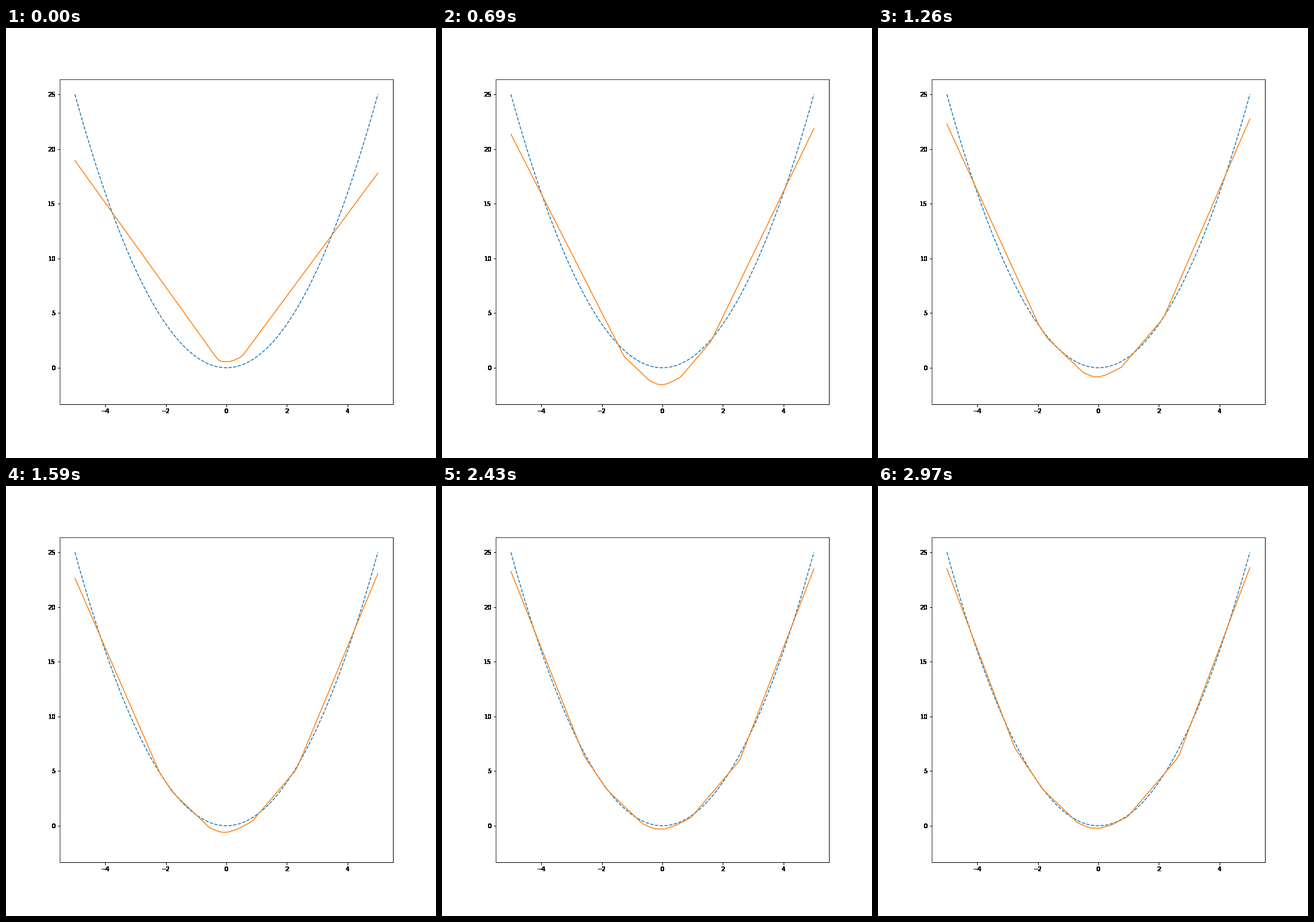
Write a matplotlib script that moves like this. It is 720 by 720 pixels and loops after 3000 ms.

```python
import matplotlib.pyplot as plt
import numpy as np
from matplotlib.animation import FuncAnimation

FRAMES, STEP = 100, 30
DIP = 0.42     # seconds until the fit has sunk to its lowest point
LOW = -1.99    # lowest value the y range is fitted to

x = np.linspace(-5, 5, 100)

# Inner pieces of the fit: fixed slopes, with their final height above
# the tangent of x**2 that has the same slope
slopes = np.array([-4.1, -2.65, -1.15, -0.1, 0.8, 1.4, 3.25])
rest = np.array([0, 0.22, -0.15, -0.15, -0.05, 0, 0.33])


def settle(t, start, dip, end, tau):
    """Ease from start to dip, then relax exponentially to end."""
    if t < DIP:
        return dip + (start - dip) * (1 - t / DIP) ** 1.4
    return end + (dip - end) * np.exp((DIP - t) / tau)


def fitted(t):
    """Convex piecewise-linear fit: the upper envelope of straight lines."""
    sq = slopes ** 2
    lift = settle(t, 0.56 + 0.125 * sq, 0.135 * sq - 2.1, rest,
                  0.8 / (1 + 0.1 * sq))
    inner = slopes[:, None] * x + (lift - sq / 4)[:, None]

    # Outer arms hang from the curve's two ends
    left = (settle(t, 18.95, 20.76, 23.95, 1.3)
            - settle(t, 3.86, 5.1, 8.8, 2.8) * (x + 5))
    right = (settle(t, 17.8, 21.2, 23.75, 0.9)
             - settle(t, 3.74, 5.32, 7.8, 1.5) * (5 - x))
    return np.vstack([inner, left, right]).max(axis=0)


def solid_ink(img, dpi):
    """Turn every touched pixel fully black, for hard-edged labels."""
    out = np.zeros_like(img)
    out[..., 3] = img[..., 3] > 0
    return out, 0, 0


fig = plt.figure(figsize=(10, 10), dpi=72, facecolor="white")
ax = fig.add_axes((0.125, 0.125, 0.775, 0.755))
pad = 0.05 * (25 - LOW)
ax.set(xlim=(-5.5, 5.5), ylim=(LOW - pad, 25 + pad),
       xticks=range(-4, 5, 2), yticks=range(0, 26, 5))
for axis in (ax.xaxis, ax.yaxis):
    axis.set_agg_filter(solid_ink)
ax.spines[["right", "bottom"]].set_linewidth(1)

ax.plot(x, x ** 2, "--", color="tab:blue", lw=1.5)
curve, = ax.plot(x, fitted(0), color="tab:orange", lw=1.5)


def update(frame):
    curve.set_ydata(fitted(frame * STEP / 1000))
    return curve,


anim = FuncAnimation(fig, update, frames=FRAMES, interval=STEP,
                     repeat=True, repeat_delay=0)
plt.show()
```
